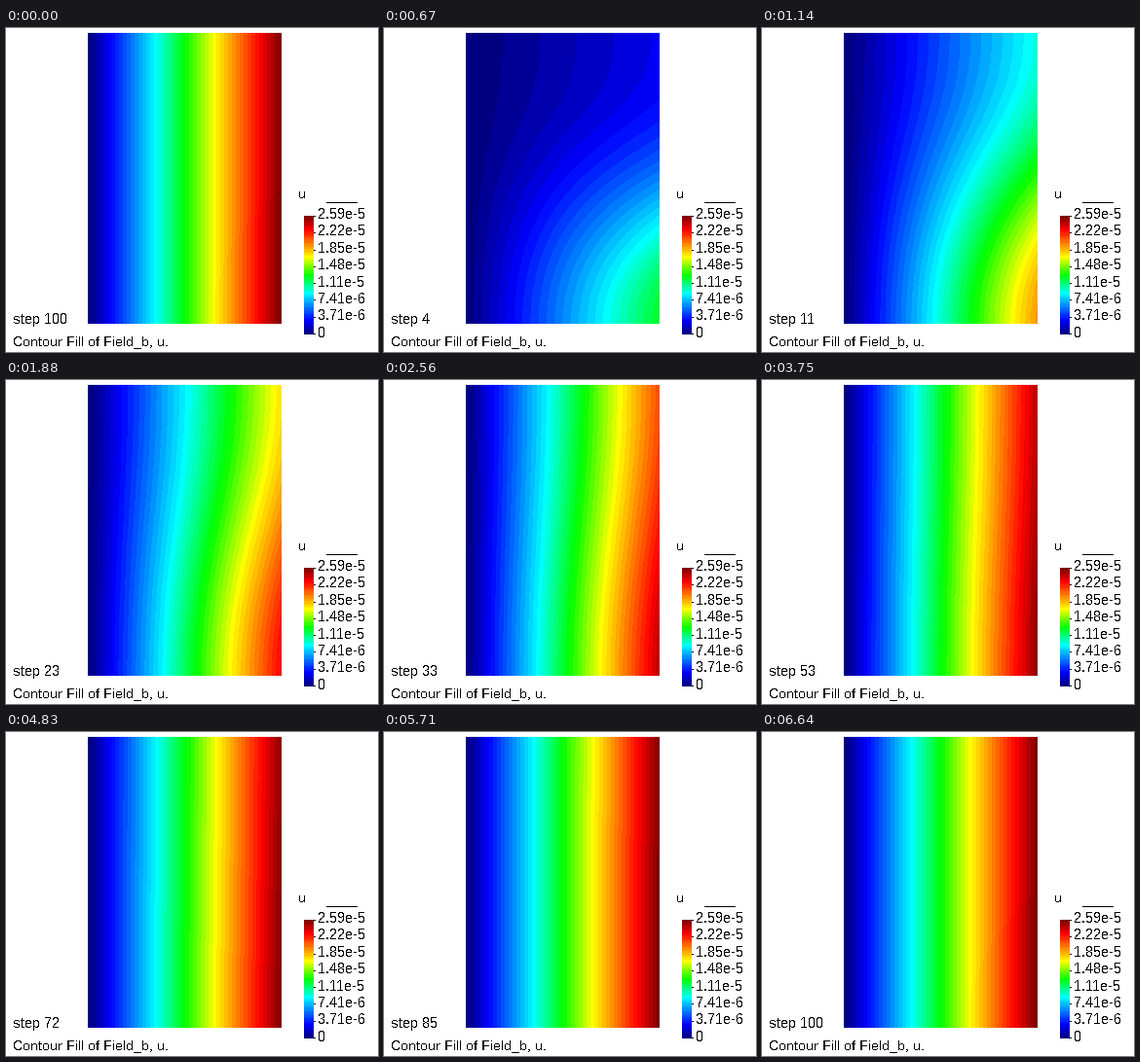
Write a matplotlib script that moves like this. It is 382 px wide and 333 px high and loops after 7.02 s.

```python
import numpy as np
import matplotlib.pyplot as plt
from matplotlib.animation import FuncAnimation
from matplotlib.colors import LinearSegmentedColormap

plt.rcParams.update({
    "font.family": "Liberation Sans",
    "text.antialiased": False,
    "text.hinting": "native",
    "text.hinting_factor": 1,
})

W, H, DPI = 382, 333, 64
LOOP, TICK, START = 7020, 20, 450
LEFT, RIGHT, TOP, BOTTOM = 84, 283, 5, 304
LEVELS = 50
PEAK = 2.594e-5

# Key times (ms) and the simulation step reached at each
TIMES = [START, 1140, 1880, 2560, 3750, 4830, 6640]
STEPS = [1, 11, 23, 33, 53, 72, 100]

RAINBOW = LinearSegmentedColormap.from_list("rainbow", [
    (0, "#000080"), (0.11, "#0000ff"), (0.345, "#00ffff"), (0.5, "#00ff00"),
    (0.655, "#ffff00"), (0.89, "#ff0000"), (1, "#800000"),
], N=1024)


def centres(n):
    """Pixel centres of n cells on the unit interval."""
    return (np.arange(n) + 0.5) / n


ACROSS = centres(RIGHT - LEFT)
HEIGHT = 1 - centres(BOTTOM - TOP)


def step_at(ms):
    return int(np.interp(ms, TIMES, STEPS)) if ms >= START else STEPS[-1]


def banded(u):
    band = np.clip(np.floor(u * LEVELS), 0, LEVELS - 1)
    return RAINBOW(band / (LEVELS - 1))


def field(n):
    """Value grows linearly in x; its slope diffuses upward from the base."""
    fast = np.exp(-0.3 * n)
    base = 1 - 0.45 * np.exp(-0.06 * n) - 0.55 * fast
    top = 1 - 1.2 * np.exp(-0.057 * n) + 0.2 * fast
    power = 1.12 + 0.9 * np.exp(-n / 5)
    reach = (0.5 + 0.5 * np.cos(np.pi * HEIGHT)) ** power
    return np.outer(top + (base - top) * reach, ACROSS)


fig = plt.figure(figsize=(W / DPI, H / DPI), dpi=DPI, facecolor="white")
ax = fig.add_axes([0, 0, 1, 1])


def image(rgba, x0, x1, y0, y1):
    return ax.imshow(rgba, extent=(x0, x1, y1, y0), aspect="auto",
                     interpolation="nearest")


def label(x, baseline, text, px=14.6):
    return ax.text(x, baseline, text, fontsize=px * 72 / DPI,
                   color="black", va="baseline")


def rule(x0, x1, y):
    ax.fill_between([x0, x1], y, y + 1, color="black", lw=0,
                    antialiased=False)


plot = image(banded(field(STEPS[-1])), LEFT, RIGHT, TOP, BOTTOM)
image(banded(1 - centres(122))[:, None], 306, 316, 193, 315)

for i in range(8):
    value = PEAK * (7 - i) / 7
    text = f"{value:.2e}".replace("e-0", "e-") if value else "0"
    label(320, 196 + round(17.4 * i), text)
    rule(316, 318, 193 + round(17.3 * i))

label(300, 175, "u", 14)
rule(329, 361, 179)
label(7, 326, "Contour Fill of Field_b, u.", 14)
counter = label(7, 304, f"step {STEPS[-1]}")

ax.set_xlim(0, W)
ax.set_ylim(H, 0)
ax.axis("off")


def update(k):
    n = step_at((k + 0.5) * TICK)
    plot.set_data(banded(field(n)))
    counter.set_text(f"step {n}")
    return plot, counter


anim = FuncAnimation(fig, update, frames=LOOP // TICK, interval=TICK,
                     repeat=True, repeat_delay=0)
plt.show()
```
